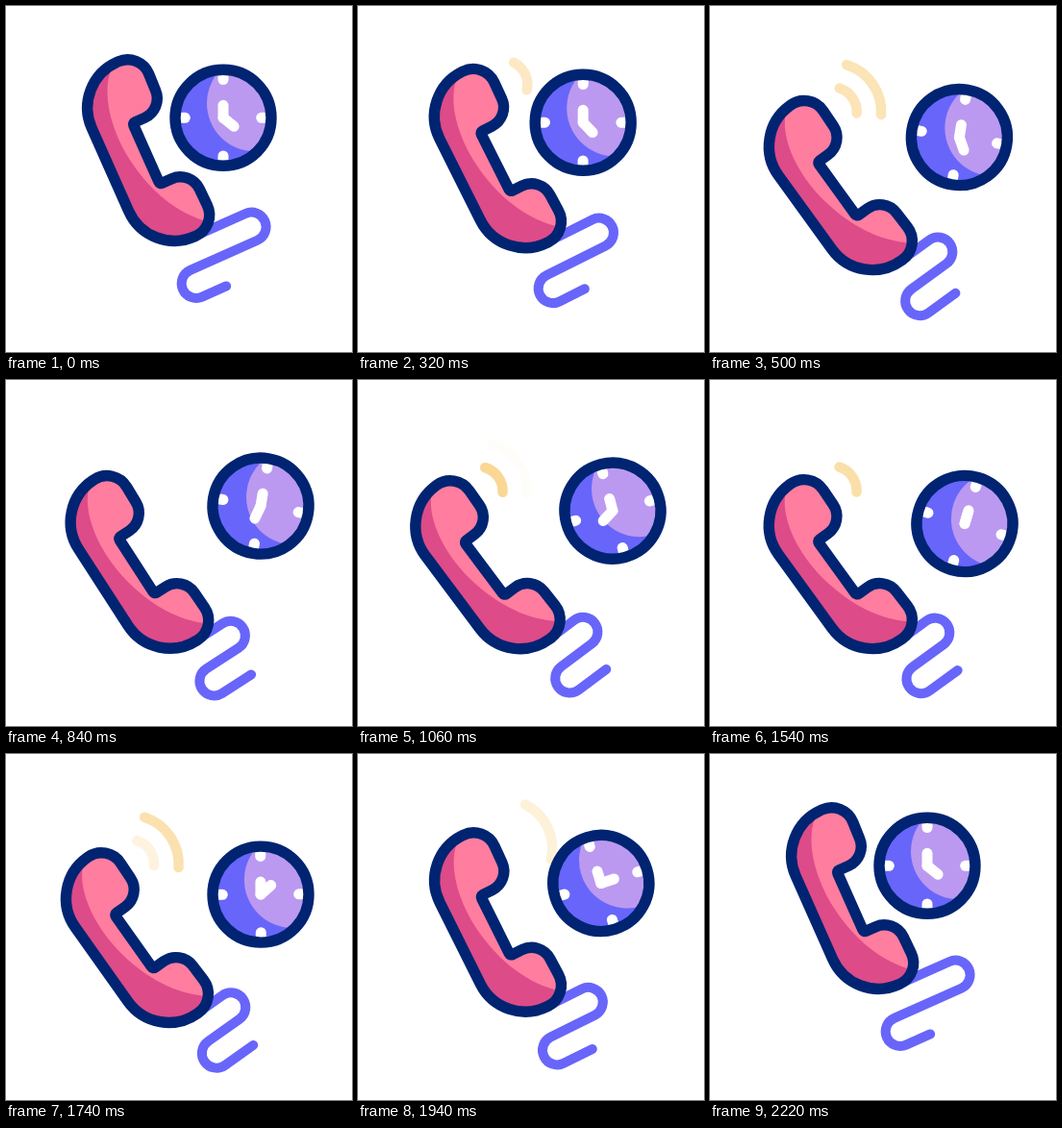
An HTML page with a canvas for the animation above (2400 ms loop, 360 by 360 pixels).

```html
<!DOCTYPE html>
<html lang="en">
<head>
<meta charset="utf-8">
<title>Call time</title>
<style>
  html, body { margin: 0; width: 100%; height: 100%; overflow: hidden; background: #fff; }
  canvas { display: block; width: 360px; height: 360px; }
</style>
</head>
<body>
<canvas id="stage"></canvas>
<script>
const LOOP = 2400, SIZE = 360, OUTLINE = 11.4;
const NAVY = '#002471', PURPLE = '#6865fa', LILAC = '#bb99f0';
const ROSE = '#dd4b88', PINK = '#ff7d9f', AMBER = '#f9d080';

const canvas = document.getElementById('stage');
const scale = window.devicePixelRatio || 1;
canvas.width = canvas.height = SIZE * scale;
const ctx = canvas.getContext('2d');

const rad = deg => deg * Math.PI / 180;
const mix = (a, b, k) => a + (b - a) * k;
const clamp = v => Math.min(1, Math.max(0, v));
const ease = u => (1 - Math.cos(Math.PI * clamp(u))) / 2;

// Eased value between [time, value] keys
function keyed(t, keys) {
  if (t <= keys[0][0]) return keys[0][1];
  for (let i = 1; i < keys.length; i++) {
    const [t0, v0] = keys[i - 1], [t1, v1] = keys[i];
    if (t < t1) return mix(v0, v1, ease((t - t0) / (t1 - t0)));
  }
  return keys[keys.length - 1][1];
}

const TILT = [[200, 66], [660, 49.7], [860, 57.3], [1060, 53.2], [1200, 54],
              [1540, 54], [1660, 49.7], [1850, 62.5], [1940, 63.5], [2200, 66]];
const SWING = [[300, 0], [700, 18], [1130, -17], [1540, 16.5], [1940, -17], [2200, 0]];
const BOB = [[500, 0], [860, -9], [1440, 10], [2140, 0]];
const INNER = [420, 1030, 1600];
const OUTER = [580, 1240, 1810];

// 1 in the raised pose, 0 in the ringing pose
const lift = t => t < 1200 ? 1 - ease((t - 200) / 400) : ease((t - 1790) / 400);

const pulse = (t, peaks) =>
  Math.max(0, ...peaks.map(p => 1 - Math.abs(t - p) / 188));

function handAngle(t) {
  const w = Math.pow(clamp((t - 200) / 2000), 1.25);
  return 129 + 360 * (w - 0.35 * Math.sin(2 * Math.PI * w) / (2 * Math.PI));
}

function stroke(color, width) {
  ctx.strokeStyle = color;
  ctx.lineWidth = width;
  ctx.stroke();
}

function circle(x, y, r) {
  ctx.beginPath();
  ctx.arc(x, y, r, 0, 2 * Math.PI);
}

function disc(x, y, r, color) {
  circle(x, y, r);
  ctx.fillStyle = color;
  ctx.fill();
}

function spoke(deg, from, to) {
  const x = Math.sin(rad(deg)), y = -Math.cos(rad(deg));
  ctx.beginPath();
  ctx.moveTo(x * from, y * from);
  ctx.lineTo(x * to, y * to);
  stroke('#fff', 11);
}

function drawCord(s) {
  const right = mix(44, 70, s), left = mix(4, -6.5, s), end = mix(40, 21, s);
  const r = 15.2, top = 24, q = Math.PI / 2;
  ctx.beginPath();
  ctx.moveTo(18, top);
  ctx.lineTo(right, top);
  ctx.arc(right, top + r, r, -q, q);
  ctx.lineTo(left, top + 2 * r);
  ctx.arc(left, top + 3 * r, r, -q, q, true);
  ctx.lineTo(end, top + 4 * r);
  stroke(PURPLE, 10);
}

function handsetPath() {
  ctx.beginPath();
  ctx.moveTo(0, -1);
  ctx.arcTo(-34.7, -1, -34.7, -36, 2.5);
  ctx.arcTo(-34.7, -36, -70, -37, 22);
  ctx.arcTo(-99.3, -38, -99.3, 40, 24);
  ctx.arcTo(-99.3, 40, 0, 40, 52);
  ctx.arcTo(99.3, 40, 99.3, -38, 52);
  ctx.arcTo(99.3, -38, 70, -37, 24);
  ctx.arcTo(34.7, -36, 34.7, -1, 22);
  ctx.arcTo(34.7, -1, 0, -1, 2.5);
  ctx.closePath();
}

function drawHandset() {
  handsetPath();
  ctx.fillStyle = ROSE;
  ctx.fill();
  ctx.save();
  ctx.clip();
  ctx.beginPath();
  ctx.moveTo(-100, -10);
  ctx.bezierCurveTo(-85, 14, -40, 25, 6, 16);
  ctx.bezierCurveTo(38, 9.7, 69, -4, 91, -31);
  ctx.lineTo(91, -60);
  ctx.lineTo(-100, -60);
  ctx.fillStyle = PINK;
  ctx.fill();
  ctx.restore();
  handsetPath();
  stroke(NAVY, OUTLINE);
}

function drawWave(r, alpha) {
  if (alpha <= 0) return;
  ctx.globalAlpha = alpha;
  ctx.beginPath();
  ctx.arc(-68.4, -44.3, r, rad(-127), rad(-50.5));
  stroke(AMBER, 10.5);
  ctx.globalAlpha = 1;
}

function drawPhone(t, s) {
  const tilt = rad(keyed(t, TILT));
  ctx.save();
  ctx.translate(175.5, 257 - 34.5 * s);
  ctx.save();
  ctx.rotate(tilt - Math.PI / 2);
  drawCord(s);
  ctx.restore();
  ctx.rotate(tilt);
  ctx.translate(-75, 0);
  drawWave(25.5, pulse(t, INNER));
  drawWave(51, pulse(t, OUTER));
  drawHandset();
  ctx.restore();
}

function drawClock(t, s) {
  ctx.save();
  ctx.translate(265 - 39 * s, 140 - 23.7 * s + keyed(t, BOB));
  ctx.rotate(rad(keyed(t, SWING)));
  disc(0, 0, 50, PURPLE);
  ctx.save();
  circle(0, 0, 50);
  ctx.clip();
  disc(33, -15, 50, LILAC);
  for (let a = 0; a < 360; a += 90) spoke(a, 48, 39.7);
  ctx.restore();
  circle(0, 0, 50);
  stroke(NAVY, OUTLINE);
  spoke(0, 0, 13);
  spoke(handAngle(t), 0, 14.3);
  ctx.restore();
}

function draw(now) {
  const t = now % LOOP, s = lift(t);
  ctx.setTransform(scale, 0, 0, scale, 0, 0);
  ctx.fillStyle = '#fff';
  ctx.fillRect(0, 0, SIZE, SIZE);
  ctx.lineCap = ctx.lineJoin = 'round';
  drawPhone(t, s);
  drawClock(t, s);
  requestAnimationFrame(draw);
}
draw(0);
</script>
</body>
</html>
```
